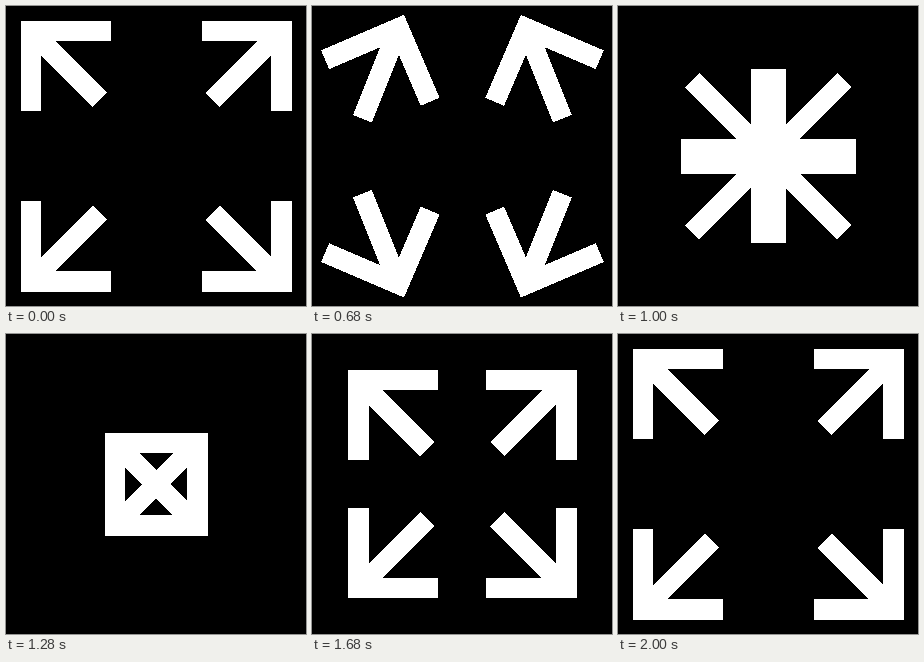
Write an HTML page that moves like this. It is 300x300 px and loops after 2040 ms.

```html
<!DOCTYPE html>
<html lang="en">
<head>
<meta charset="utf-8">
<title>Four arrows</title>
<style>
  html, body { margin: 0; width: 100%; height: 100%; overflow: hidden; background: #000; }
  svg { display: block; width: 100%; height: 100%; }
</style>
</head>
<body>
<svg viewBox="0 0 300 300" fill="#fff" shape-rendering="crispEdges">
  <defs>
    <path id="arrow" d="M-45.1-45.1H45.1V-24.7H-10.3L41.2 26.8 26.8 41.2-24.7-10.3V45.1H-45.1Z"/>
  </defs>
  <g transform="translate(150.4 150.2)">
    <g><use href="#arrow"/></g>
    <g transform="scale(-1 1)"><use href="#arrow"/></g>
    <g transform="scale(1 -1)"><use href="#arrow"/></g>
    <g transform="scale(-1 -1)"><use href="#arrow"/></g>
  </g>
</svg>
<script>
  const LOOP = 2040, STEP = 40, REST_STEPS = 12;
  const TURN_STEPS = 12.1, MOVE_STEPS = 38, MOVE_DELAY = 0.12;
  const REACH = 90.3;
  const arrows = document.querySelectorAll("use");

  const ease = x => {
    const t = Math.min(1, Math.max(0, x));
    return t * t * (3 - 2 * t);
  };

  // Each arrow turns to face the middle while gliding through it to the opposite corner.
  function draw(ms) {
    const step = Math.floor((ms % LOOP) / STEP) - REST_STEPS;
    const angle = 180 * ease(step / TURN_STEPS);
    const place = REACH * (2 * ease((step - MOVE_DELAY) / MOVE_STEPS) - 1);
    const pose = `translate(${place} ${place}) rotate(${angle})`;
    arrows.forEach(arrow => arrow.setAttribute("transform", pose));
  }

  const start = performance.now();
  function tick() {
    draw(performance.now() - start);
    requestAnimationFrame(tick);
  }
  tick();
</script>
</body>
</html>
```
